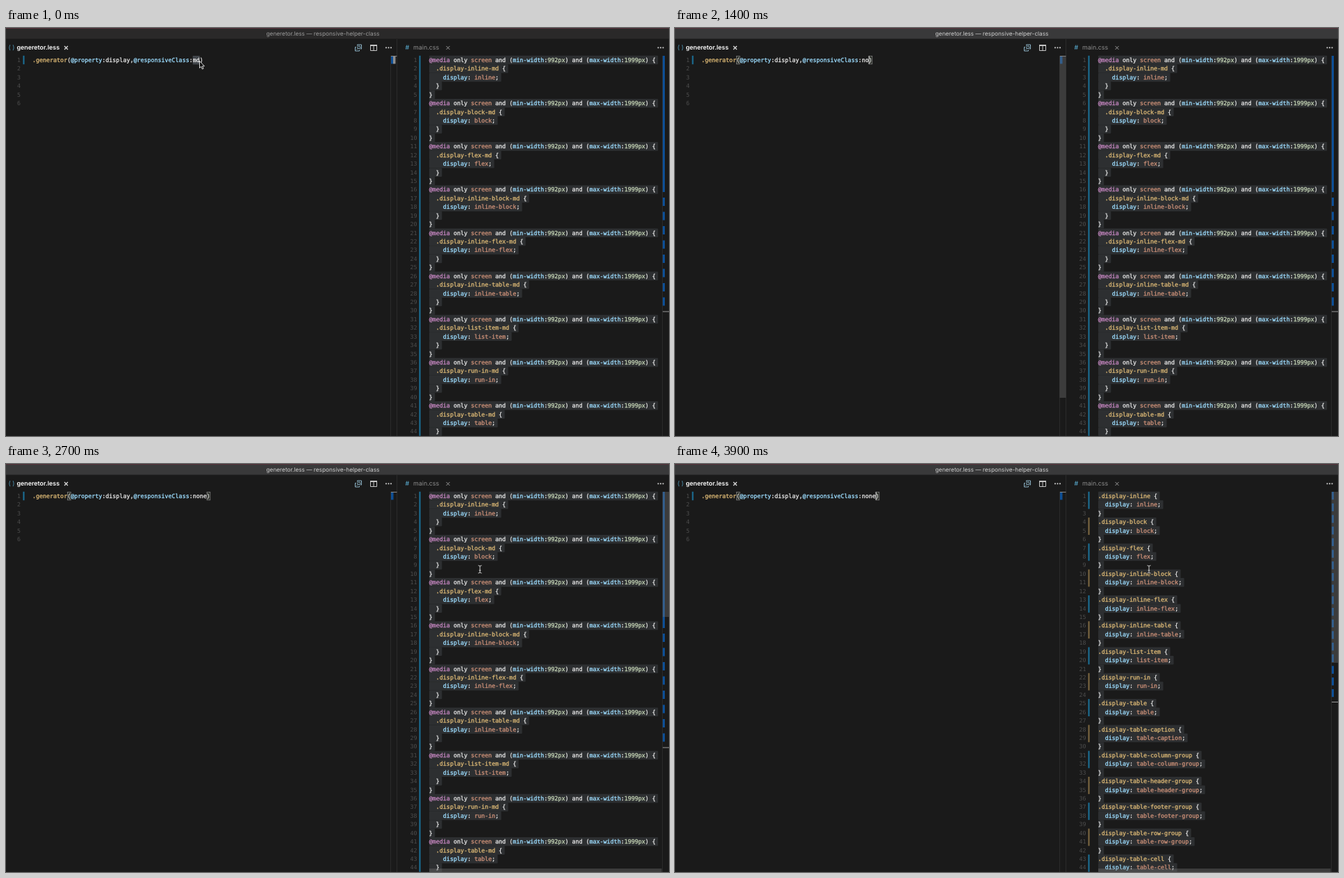
Recreate the animation shown at these times as an HTML page. Size 954x587 px, loop 8.9 s.

```html
<!DOCTYPE html>
<html lang="en">
<head>
<meta charset="utf-8">
<style>
html, body { margin: 0; width: 100%; height: 100%; overflow: hidden; background: #1a1a1a; }
svg { display: block; width: 954px; height: 587px; }
text { white-space: pre; text-rendering: geometricPrecision; }
.code { font: 8.33px "DejaVu Sans Mono", monospace; stroke-width: .3px; }
.ui { font: 8.9px Inter, sans-serif; }
</style>
</head>
<body>
<svg viewBox="0 0 954 587">
  <rect width="954" height="587" fill="#1a1a1a"/>
  <rect id="titlebar" width="954" height="15.5"/>
  <rect width="954" height="1" fill="#56303a"/>
  <path d="M562.5 16V587M553.5 40V587M944.5 40V587" stroke="#2a2a2a"/>
  <text id="title" class="ui" x="456" y="11" text-anchor="middle" style="font-size:8.26px">generetor.less — responsive-helper-class</text>
  <g class="ui">
    <text x="3.5" y="31" fill="#519aba">( )</text>
    <text x="15.5" y="31" fill="#fff" font-weight="600">generetor.less</text>
    <text x="574.5" y="31" fill="#519aba" font-weight="600">#</text>
    <text x="586" y="31" fill="#8e8e8e">main.css</text>
  </g>
  <path d="M84 26l5 5m0-5l-5 5" stroke="#ddd" stroke-width="1.2"/>
  <path d="M633.5 26l5 5m0-5l-5 5" stroke="#999"/>
  <g fill="none" stroke="#c5c5c5">
    <g stroke="#8fb6c9">
      <path d="M504 27.5h-1.5v5.5h6v-1.5M505.5 25.5v-1.5h6v6h-1.5"/>
      <circle cx="507.8" cy="27.8" r="2"/>
      <path d="M506.3 29.3l-2 2"/>
    </g>
    <path d="M524.5 25v7.5h9V25M529 25v7.5"/>
    <path d="M524 25h10" stroke-width="2"/>
  </g>
  <g id="dots" fill="#c5c5c5"></g>
  <g id="left" class="code"></g>
  <g id="right" class="code"></g>
  <g id="rulers"></g>
  <g id="mouse"></g>
</svg>
<script>
const LOOP = 8900, CH = 5.015, LH = 12.43, TOP = 39.8, ROWS = 44;
const FG = '#e6e6e6', BLUE = '#9cdcfe', GOLD = '#deba76', ORANGE = '#ce9178',
      PURPLE = '#c586c0', GREEN = '#c3d3b4';
const MODIFIED = '#1b7299', ADDED = '#806a42', MARK = '#0d4f96';
const $ = id => document.getElementById(id);
const rowTop = i => TOP + i * LH;
const rect = (x, y, w, h, fill, extra = '') =>
  `<rect x="${x}" y="${y}" width="${w}" height="${h}" fill="${fill}" ${extra}/>`;
const codeLine = (x, row, parts) =>
  `<text x="${x}" y="${rowTop(row) + 9.2}">` +
  parts.map(([s, c]) => `<tspan fill="${c}" stroke="${c}">${s}</tspan>`).join('') + '</text>';
const lineNo = (x, row) =>
  `<text x="${x}" y="${rowTop(row) + 9.2}" text-anchor="end" fill="#4c4c4c">${row + 1}</text>`;
const bar = (x, row, n, fill) => rect(x, rowTop(row), 2, n * LH, fill);

const values = ('inline block flex inline-block inline-flex inline-table list-item run-in table ' +
  'table-caption table-column-group table-header-group table-footer-group table-row-group table-cell').split(' ');

const mediaRule = v => [
  [['@media', PURPLE], [' only ', FG], ['screen', ORANGE], [' and (', FG], ['min-width', BLUE], [':', FG],
   ['992px', GREEN], [') and (', FG], ['max-width', BLUE], [':', FG], ['1999px', GREEN], [') {', FG]],
  [[`  .display-${v}-md`, GOLD], [' {', FG]],
  [['    display', BLUE], [': ', FG], [v, ORANGE], [';', FG]],
  [['  }', FG]],
  [['}', FG]]
];
const plainRule = v => [
  [[`.display-${v}`, GOLD], [' {', FG]],
  [['  display', BLUE], [': ', FG], [v, ORANGE], [';', FG]],
  [['}', FG]]
];
// Colours left over from the previous text until the editor re-tokenizes.
const staleRule = v => {
  const s = `.display-${v}`, tail = s.lastIndexOf('-');
  return [
    [[s.slice(0, 5), FG], [s.slice(5, tail), BLUE], [s.slice(tail), GREEN], [' {', FG]],
    [[`  display: ${v};`, GOLD]],
    [['}', FG]]
  ];
};

function listing(rule) {
  return values.flatMap(rule).slice(0, ROWS).map((parts, i) => {
    const n = parts.reduce((sum, [s]) => sum + s.length, 0);
    return rect(609, rowTop(i), (n + .65) * CH, LH + .1, '#2d2f31', 'rx="1"') +
      lineNo(591.5, i) + codeLine(608.8, i, parts);
  }).join('');
}
const listings = { media: listing(mediaRule), stale: listing(staleRule), plain: listing(plainRule) };

const groupBars = (from, colour) => {
  let s = '';
  for (let g = from; g < 15; g++) s += bar(594.5, g * 3, 2, colour(g));
  return s;
};
const gutters = {
  media: bar(594.5, 0, ROWS, MODIFIED),
  early: bar(594.5, 0, 29, MODIFIED) + groupBars(10, () => MODIFIED),
  late: groupBars(0, g => g % 2 ? ADDED : MODIFIED)
};

function marks(solid, start, step, h, n, end) {
  let s = solid ? rect(945, 40, 3, solid, MARK) : '';
  for (let i = 0; i < n; i++) s += rect(945, start + i * step, 3, h, MARK);
  return s + rect(945, end, 9, 1, '#9a9a9a');
}
const rulers = {
  media: marks(196, 244, 20.5, 12, 8, 407.5),
  early: marks(162, 207, 16.7, 11.3, 8, 342),
  late: marks(0, 40, 16.7, 11.3, 18, 342)
};

const ease = (t, a, b) => {
  const p = Math.min(1, Math.max(0, (t - a) / (b - a)));
  return p * p * (3 - 2 * p);
};
const slider = (x, y, w, h, o) => rect(x, y, w, h, '#797979', `opacity="${.36 * o}"`);

function leftPane(t) {
  const typing = t >= 1100, focused = t >= 400;
  const word = typing ? 'none'.slice(0, Math.min(4, 1 + Math.floor((t - 1100) / 200))) : 'md';
  const x0 = 38, end = x0 + (46 + word.length) * CH;
  let s = bar(24.5, 0, 1, MODIFIED);
  for (let i = 0; i < 6; i++) s += lineNo(21, i);
  if (typing) {
    for (const x of [x0 + 10 * CH, end])
      s += rect(x + .3, 40.5, CH - .3, 11.3, '#22261f', 'stroke="#858585" stroke-width=".8"');
  } else {
    s += rect(x0 + 46 * CH, 40, 2 * CH, LH, focused ? '#2c4258' : '#42464b');
  }
  s += codeLine(x0, 0, [['.generator', GOLD], ['(', FG], ['@property', BLUE], [':display,', FG],
    ['@responsiveClass', BLUE], [`:${word})`, FG]]);
  if (typing && !(t >= 2650 && t < 3250)) s += rect(end, 40, 1, 12, '#c8c8c8');
  return s;
}

function mouse(t) {
  const near = ease(t, 100, 400), far = ease(t, 2200, 2600);
  if (t < 400)
    return `<path transform="translate(${278.5 - 2 * near} ${47.5 - 3 * near})" d="M0 0V10l2.3-2 1.6 3.6 1.7-.7-1.6-3.5h3z" fill="#111" stroke="#eee" stroke-width=".9"/>`;
  if (t >= 1100 && t < 2200) return '';
  const d = 'M-2.5-5.5Q0-5.5 0-4V4Q0 5.5-2.5 5.5M2.5-5.5Q0-5.5 0-4M0 4Q0 5.5 2.5 5.5M-1.3 1.5h2.6';
  return `<g transform="translate(${276 + 406 * far} ${45.5 + 106 * far})" fill="none">` +
    `<path d="${d}" stroke="#111" stroke-width="2"/><path d="${d}" stroke="#eee" stroke-width=".9"/></g>`;
}

const cache = {};
function put(id, html) {
  if (cache[id] !== html) $(id).innerHTML = cache[id] = html;
}

function draw(t) {
  const focused = t >= 400, saved = t >= 3300;
  const text = !saved ? 'media' : t < 3400 ? 'stale' : 'plain';
  const diff = !saved ? 'media' : t < 3700 ? 'early' : 'late';
  const hoverLeft = ease(t, 400, 600) * (1 - ease(t, 2300, 2650));
  const hoverRight = ease(t, 2400, 2650);
  $('titlebar').setAttribute('fill', focused ? '#39393a' : '#2a2929');
  $('title').setAttribute('fill', focused ? '#cfcfcf' : '#9b9b9b');
  put('left', leftPane(t));
  put('right', listings[text] + gutters[diff]);
  put('rulers', rulers[diff] +
    rect(554, 40.5, 3.5, 11, MARK) + rect(554, 40, 8.5, 1, '#8a8a8a') +
    (focused ? '' : rect(557, 41, 3.5, 10.5, '#8f8f8f')) +
    slider(553.5, 40, 9, 492, hoverLeft) +
    slider(945, 40, 9, saved ? 246 : 180, hoverRight) +
    slider(609, 582, 334.5, 5, hoverRight));
  put('mouse', mouse(t));
}

$('dots').innerHTML = [550.5, 942].map(x =>
  [-3.5, 0, 3.5].map(d => `<circle cx="${x + d}" cy="28.3" r="1.1"/>`).join('')).join('');

const start = performance.now();
function tick() {
  const t = (performance.now() - start) % LOOP;
  draw(Math.floor(t / 100) * 100);
  requestAnimationFrame(tick);
}
tick();
</script>
</body>
</html>
```
